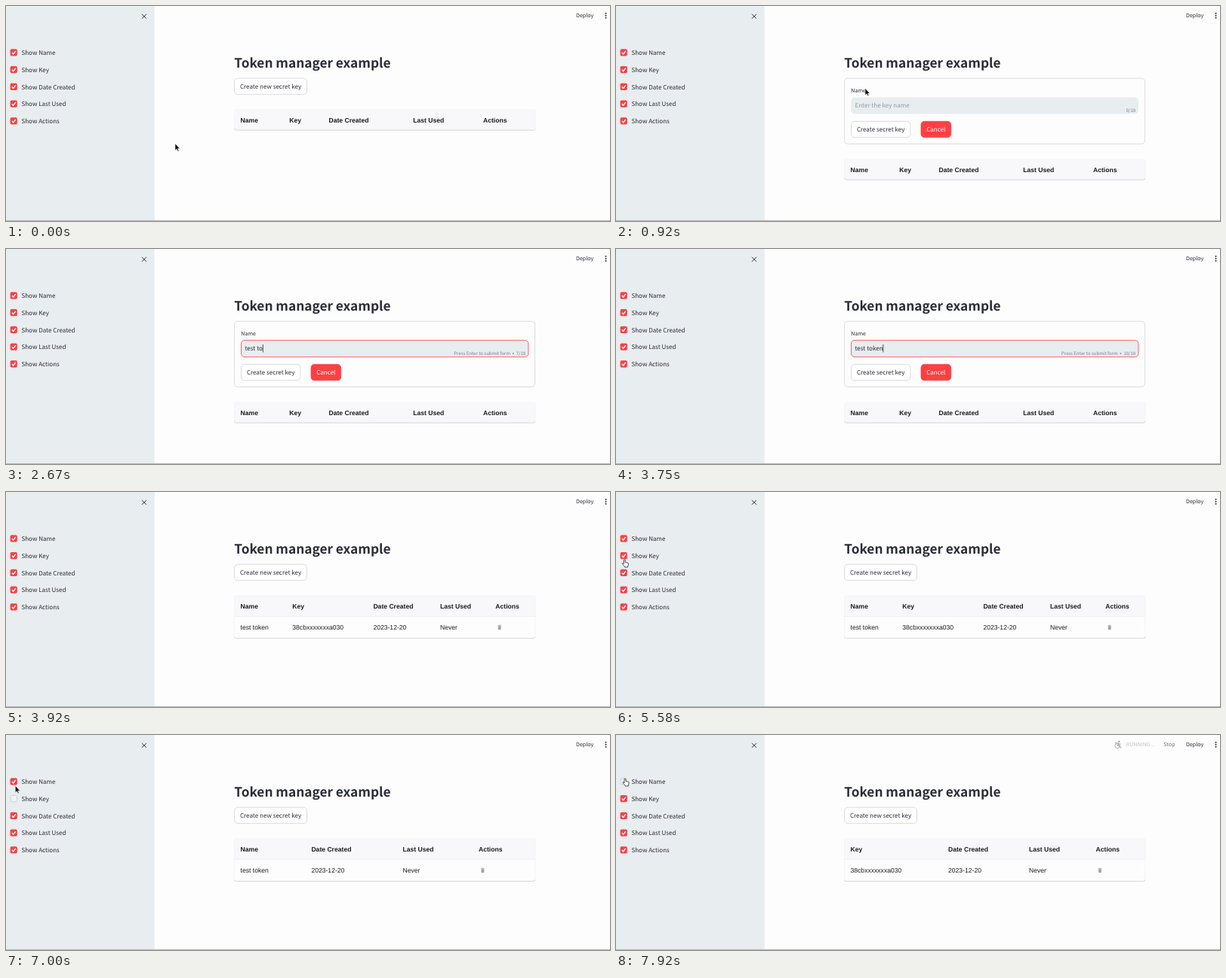
An HTML page that plays this animation: 800 px wide and 286 px high, repeating every 8 s.

```html
<!DOCTYPE html>
<html lang="en">
<head>
<meta charset="utf-8">
<title>Token manager example</title>
<style>
  html, body { margin: 0; width: 100%; height: 100%; overflow: hidden; background: #fdfdfd; }
  svg { display: block; width: 800px; height: 286px; }
  text {
    font: 8.06px "Noto Sans CJK JP", "Noto Sans CJK SC", "Noto Sans CJK", "Noto Sans", sans-serif;
    fill: #2b2d38; text-rendering: geometricPrecision; white-space: pre;
  }
  .title { font-size: 17.25px; font-weight: 700; }
  .small { font-size: 7.1px; }
  .tiny { font-size: 6.05px; fill: #7b7e87; }
  .hint { fill: #969aa3; }
  .head, .cell { font: 8.6px "Liberation Sans", Arial, sans-serif; fill: #1c1c20; }
  .head { font-weight: 700; }
  .light { fill: #fff; }
  .faint { fill: #c0c2c7; }
  .grey { fill: #74767e; }
</style>
</head>
<body>
<svg viewBox="0 0 800 286"><g id="page"></g><g id="live"></g></svg>
<script>
const LOOP = 8000, FPS = 12;
const RED = '#fd4043', PANEL = '#e8edf0', EDGE = '#d2d4d9';
const TOKEN = 'test token';
const KEY_TIMES = [1670, 1830, 1920, 2000, 2170, 2500, 2670, 2830, 2920, 3000];
const OPEN = 830, FOCUS = 1420, SUBMIT = 3830;
const LABELS = ['Name', 'Key', 'Date Created', 'Last Used', 'Actions'];
const CELLS = [TOKEN, '38cbxxxxxxxa030', '2023-12-20', 'Never'];

// Column starts per table layout; null hides the column.
const EMPTY = [310.5, 375.3, 427.5, 539.3, 632];
const FULL = [310.5, 379.3, 486.4, 575, 648.3];
const NO_KEY = [310.5, null, 404.4, 525.5, 626];
const NO_NAME = [null, 310.5, 440, 547, 635.6];
const LAYOUTS = [[0, EMPTY], [SUBMIT, FULL], [6000, NO_KEY], [7420, FULL], [7920, NO_NAME]];

// time, x, y, pointer kind from that time on
const POINTER = [
  [0, 224, 183, 'arrow'], [170, 224, 183, 'arrow'], [580, 326, 112, 'hand'],
  [670, 331, 109, 'hand'], [830, 330, 109.5, 'arrow'], [1000, 330, 109.5, 'arrow'],
  [1250, 472, 133, 'beam'], [1670, 472, 133, ''], [4170, 472, 146, 'arrow'],
  [4420, 405, 98, 'arrow'], [4500, 405, 98, 'arrow'], [4830, 386, 163, 'arrow'],
  [5000, 386, 163, 'arrow'], [5500, 13, 91, 'hand'], [5580, 11.3, 90, 'hand'],
  [5830, 11.3, 86, 'hand'], [6420, 11.3, 86, 'hand'], [6670, 12, 72, 'arrow'],
  [6920, 12.3, 67.5, 'arrow'], [7080, 12.3, 67.5, 'arrow'], [7250, 11.3, 85, 'hand'],
  [7500, 11.3, 85, 'hand'], [7750, 12, 58, 'hand'], [LOOP, 12, 58, 'hand']
];
const SHAPES = {
  arrow: '<path d="M0 0V9.2L2.1 7.3 3.6 10.3 5 9.7 3.5 6.7H6.3Z" fill="#000" stroke="#fff" stroke-width=".6"/>',
  hand: '<path d="M-1 5.8V1a1 1 0 0 1 2 0V3.8q.8-.6 1.4.2 .9-.5 1.4.3 1.2-.3 1.2.8V7q0 1.2-.8 2V10H.4q-.4-1.2-1.4-2.2L-2.9 5.6q-.2-1 .8-1z" fill="#fff" stroke="#222" stroke-width=".8"/>',
  beam: '<path d="M-1.5-4.5Q0-4.5 0-3.5Q0-4.5 1.5-4.5M0-3.5V3.5M-1.5 4.5Q0 4.5 0 3.5Q0 4.5 1.5 4.5" fill="none" stroke="#222" stroke-width=".8"/>'
};

const text = (x, y, s, cls = '', anchor = 'start') =>
  `<text x="${x}" y="${y}" class="${cls}" text-anchor="${anchor}">${s}</text>`;
const rect = (x, y, w, h, fill, stroke = 'none', r = 0) =>
  `<rect x="${x}" y="${y}" width="${w}" height="${h}" rx="${r}" fill="${fill}" stroke="${stroke}" stroke-width=".8"/>`;
const line = (d, color, width) =>
  `<path d="${d}" fill="none" stroke="${color}" stroke-width="${width}"/>`;
const dot = (x, y, r, fill) => `<circle cx="${x}" cy="${y}" r="${r}" fill="${fill}"/>`;
const within = (t, a, b) => t >= a && t < b;
const latest = (rows, t) => rows.filter(row => row[0] <= t).pop();

const pen = document.createElement('canvas').getContext('2d');
function textWidth(s) {
  pen.font = '806px "Noto Sans CJK JP", "Noto Sans CJK SC", "Noto Sans CJK", "Noto Sans", sans-serif';
  return pen.measureText(s).width / 100;
}

function page() {
  return rect(0, 0, 196.7, 286, PANEL)
    + line('M180 10.8l6 6m0-6l-6 6', '#33353f', 1)
    + LABELS.map((s, i) => text(20.4, 65 + 22.75 * i, 'Show ' + s)).join('')
    + text(755, 15.4, 'Deploy', 'small')
    + [9.8, 12.8, 15.8].map(y => dot(794.5, y, 1, '#2b2d38')).join('')
    + text(302.3, 82, 'Token manager example', 'title')
    + rect(0, 285, 800, 1, '#b4b6b9');
}

function checkbox(i, on) {
  const y = 57.3 + 22.75 * i;
  return on
    ? rect(5.6, y, 9.2, 9.2, RED, 'none', 1.8) + line(`M7.8 ${y + 4.7}l1.8 1.9 3.1-3.9`, '#fff', 1.3)
    : rect(6, y + .4, 8.4, 8.4, '#f0f3f5', '#c3c7cd', 1.6);
}

function button(x, y, w, label, main) {
  return rect(x, y, w, 21.4, main ? RED : '#fff', main ? RED : EDGE, 4.5)
    + text(x + w / 2, y + 13.8, label, main ? 'light' : '', 'middle');
}

function form(t) {
  const n = KEY_TIMES.filter(k => k <= t).length;
  const typed = TOKEN.slice(0, n);
  const focused = t >= FOCUS;
  const shift = n > 9 ? 3.4 : 0;
  let out = rect(302.6, 96.2, 398, 87.2, 'none', EDGE, 4.5)
    + text(311.3, 114.6, 'Name', 'small')
    + rect(311.5, 121.4, 380.4, 22.2, PANEL, focused ? RED : 'none', 4.5)
    + (n ? text(316.4, 135.2, typed) : text(316.4, 135.2, 'Enter the key name', 'hint'))
    + text(688.2, 140.8, n + '/18', 'tiny', 'end');
  if (n) {
    out += text(668 - shift, 140.8, 'Press Enter to submit form', 'tiny', 'end')
      + dot(671.8 - shift, 138.8, .9, '#7b7e87');
  }
  if (focused && !within(t, 3330, 3750)) {
    out += rect(316.2 + textWidth(typed), 127, .8, 10.5, '#222');
  }
  return out + button(311.5, 153.4, 78.4, 'Create secret key')
    + button(404, 153.4, 39.6, 'Cancel', true);
}

function bin(x, y) {
  return line(`M${x - 2.4} ${y - 2.3}h4.8M${x - .8} ${y - 3}h1.6`, '#8f8f92', .8)
    + rect(x - 1.9, y - 1.6, 3.8, 4.6, '#a2a2a5', 'none', .6);
}

function table(t, y) {
  const cols = latest(LAYOUTS, t)[1];
  const filled = cols !== EMPTY;
  const bottom = y + (filled ? 57.4 : 28);
  let out = rect(302.5, y, 398.5, 28, '#f8f8fa', 'none', 2)
    + line(`M302.6 ${y + 2}V${bottom - 2}M700.8 ${y + 2}V${bottom - 2}`, '#efeff2', .6)
    + line(`M302.6 ${bottom - 2}q0 2 2 2H698.8q2 0 2-2`, '#cfcfd3', .8);
  if (filled) out += line(`M302.5 ${y + 28.3}H701`, '#ececef', .7);
  cols.forEach((x, i) => {
    if (x === null) return;
    out += text(x, y + 17.3, LABELS[i], 'head');
    if (filled) out += i < 4 ? text(x, y + 46, CELLS[i], 'cell') : bin(x + 5.4, y + 43);
  });
  return out;
}

function running() {
  return dot(666.3, 8.8, 1.3, '#a9abb0')
    + '<circle cx="664" cy="14.6" r="3" fill="none" stroke="#a9abb0"/>'
    + line('M661 10.6l4.4.3-1 3.2h3l1.2 3.6M665.4 11.2l3.2 1', '#a9abb0', 1.1)
    + text(675.7, 15.4, 'RUNNING...', 'small faint')
    + text(725.3, 15.4, 'Stop', 'small grey');
}

function pointer(t) {
  const i = POINTER.findIndex(p => p[0] > t);
  const [t0, x0, y0, kind] = POINTER[i - 1], [t1, x1, y1] = POINTER[i];
  if (!kind) return '';
  const u = (t - t0) / (t1 - t0), e = u * u * (3 - 2 * u);
  return `<g transform="translate(${x0 + (x1 - x0) * e} ${y0 + (y1 - y0) * e})">${SHAPES[kind]}</g>`;
}

function scene(t) {
  const isOpen = within(t, OPEN, SUBMIT);
  const off = within(t, 5920, 7330) ? 1 : t >= 7830 ? 0 : -1;
  const busy = within(t, 5920, 6080) || within(t, 7330, 7500) || t >= 7830;
  return LABELS.map((_, i) => checkbox(i, i !== off)).join('')
    + (isOpen ? form(t) : button(302.6, 96.2, 95.9, 'Create new secret key'))
    + table(t, isOpen ? 203.2 : 137.2)
    + (busy ? running() : '')
    + pointer(t);
}

const live = document.getElementById('live');
document.getElementById('page').innerHTML = page();
const start = performance.now();
let shown = -1;

function draw() {
  const t = Math.max(0, performance.now() - start) % LOOP;
  const step = Math.min(LOOP * FPS / 1000 - 1, Math.floor((t + 4) * FPS / 1000));
  if (step !== shown) {
    shown = step;
    live.innerHTML = scene(Math.round(step * 100 / FPS) * 10);
  }
  requestAnimationFrame(draw);
}
draw();
</script>
</body>
</html>
```
